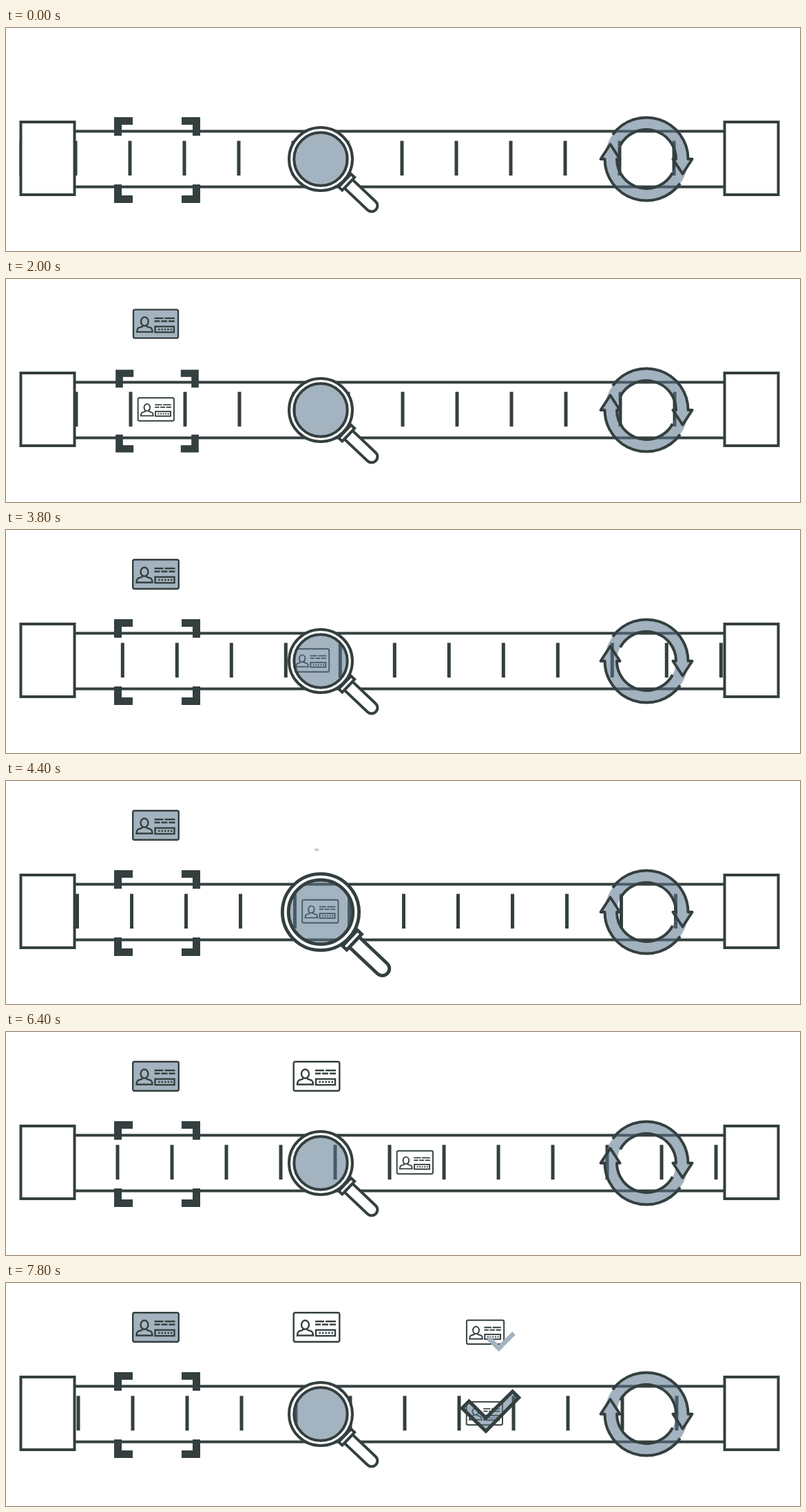
An HTML page for the animation above (8000 ms loop, 1153 by 325 pixels).

```html
<!DOCTYPE html>
<html lang="en">
<head>
<meta charset="utf-8">
<title>Document conveyor</title>
<style>
  html, body { margin: 0; width: 100%; height: 100%; overflow: hidden; background: #fff; }
  svg { display: block; width: 100vw; height: 100vh; }
  .line { fill: none; stroke: #343f3f; stroke-width: 4; }
  .solid { fill: #fff; }
  .dark { fill: #343f3f; }
  .tint { fill: #58758b; opacity: .55; }
  .blue { fill: #a3b3bf; }
</style>
</head>
<body>
<svg viewBox="0 0 1153 325">
  <defs>
    <rect id="cardFill" x="-33.3" y="-21.3" width="66.6" height="42.6" rx="2.5"/>
    <g id="cardInk" class="line" style="stroke-width:2.4">
      <use href="#cardFill"/>
      <ellipse cx="-16.5" cy="-3.5" rx="5.5" ry="6.5"/>
      <path d="M-20 2.500V4L-26 6Q-28 8-28 12H-5Q-5 8-7 6L-13 4V2.500"/>
      <path d="M-2-8.500H11M13-8.500H28M-2-4H6M8-4H17M19-4H28"/>
      <rect x="-1" y="4" width="28" height="8.5"/>
      <path d="M3.500 8.300H24" stroke-dasharray="2.5 2"/>
    </g>
    <path id="check" d="M-31-15L-41-5L-7 28L40-20L31-29L-7 9Z"/>
    <path id="corner" d="M-62.500-62.500H-35.500V-51.500H-51.500V-35.500H-62.500Z"/>
    <path id="head" d="M38.500 0H66.500L52.500 21.500Z"/>
    <path id="arrow" d="M-49-35.500A60.500 60.500 0 0 1 60.500 0H66.500L52.500 21.500L38.500 0H43A43 43 0 0 0-38-20"/>
  </defs>

  <path class="line" d="M100 150.500H1044M100 231.500H1044"/>
  <g id="ticks" class="line" style="stroke-width:5"></g>
  <g id="beltCard"><use href="#cardFill" class="solid"/><use href="#cardInk"/></g>
  <g class="line" style="fill:#fff">
    <rect x="21.5" y="137" width="78" height="106"/>
    <rect x="1043.5" y="137" width="78" height="106"/>
  </g>

  <g id="brackets" class="dark">
    <use href="#corner"/>
    <use href="#corner" transform="scale(-1 1)"/>
    <use href="#corner" transform="scale(1 -1)"/>
    <use href="#corner" transform="scale(-1)"/>
  </g>

  <g id="lens">
    <g class="line" style="fill:#fff" transform="rotate(43.5)">
      <path d="M54-10H100.500A8.500 8.500 0 0 1 100.500 7H54Z"/>
      <rect x="47" y="-14.5" width="7" height="26"/>
    </g>
    <circle class="tint" r="39"/>
    <circle r="42.5" fill="none" stroke="#fff" stroke-width="7"/>
    <circle class="line" r="46"/>
    <circle class="line" r="38.7"/>
  </g>

  <g transform="translate(930 191)" stroke-linejoin="round">
    <g class="tint">
      <circle r="51.75" fill="none" stroke="#58758b" stroke-width="17.5"/>
      <use href="#head"/>
      <use href="#head" transform="rotate(180)"/>
    </g>
    <use href="#arrow" class="line"/>
    <use href="#arrow" class="line" transform="rotate(180)"/>
  </g>

  <g id="beltCheck">
    <use href="#check" class="tint"/><use href="#check" class="line" style="stroke-width:5"/>
  </g>

  <g id="scanned"><g transform="translate(0 -38.5)">
    <use href="#cardFill" class="blue"/><use href="#cardInk"/>
  </g></g>
  <g id="inspected"><g transform="translate(0 -38.5)">
    <use href="#cardFill" class="solid"/><use href="#cardInk"/>
  </g></g>
  <g id="approved"><g transform="translate(0 -38.5)">
    <use href="#cardFill" class="solid"/><use href="#cardInk"/>
    <use href="#check" class="blue" transform="translate(28.7 17.2) scale(.63)"/>
  </g></g>
</svg>

<script>
const LOOP = 8000, STEP = 200;
const PITCH = 79, TRAVEL = 79.5;
const SCAN = 1490, INSPECT = 4085, APPROVE = 7386;   // arrival times at the stations
const POP_DELAY = 300, POP_TIME = 600;

const byId = id => document.getElementById(id);
const progress = (t, from, to) => Math.min(1, Math.max(0, (t - from) / (to - from)));
const glide = (t, from, to) => (1 - Math.cos(Math.PI * progress(t, from, to))) / 2;

// Grows from 0 to 1, shooting past the end when overshoot is above 0.
function pop(t, from, overshoot = 1.7) {
  const left = progress(t, from, from + POP_TIME) - 1;
  return 1 + (overshoot + 1) * left ** 3 + overshoot * left ** 2;
}

function wobble(t, from) {
  const u = Math.max(0, t - from);
  return 1 + .12 * Math.exp(-u / 415) * Math.sin(2 * Math.PI * u / 700);
}

const swell = (t, from) => 1 + .3 * Math.sin(Math.PI * progress(t, from, from + 1000)) ** 2;

function place(id, x, y, scale) {
  const part = byId(id);
  part.setAttribute("transform", `translate(${x} ${y}) scale(${scale})`);
  part.style.display = scale > 0 ? "" : "none";
}

byId("ticks").innerHTML = Array.from({ length: 13 }, (_, i) =>
  `<path d="M${i * PITCH} 164.500V215"/>`).join("");

function draw(now) {
  const t = Math.floor(now % LOOP / STEP) * STEP;
  const slots = 2 * glide(t, 0, SCAN) + 3 * glide(t, 2200, INSPECT) + 3 * glide(t, 5200, APPROVE);
  const offset = 22 + TRAVEL * slots;

  byId("ticks").setAttribute("transform", `translate(${22 + (offset - 22) % PITCH} 0)`);
  place("beltCard", offset + 36.8, 190, .785);
  place("brackets", 219.5, 192.5, wobble(t, SCAN));
  place("lens", 457, 191, swell(t, INSPECT));
  place("beltCheck", 704, 187.5, .94 * pop(t, APPROVE));
  place("scanned", 217.5, 103, pop(t, SCAN + POP_DELAY));
  place("inspected", 451, 103, pop(t, INSPECT + POP_DELAY, 0));
  place("approved", 696, 103, pop(t, APPROVE + POP_DELAY - 35));
}

let start;
function frame(now) {
  start ??= now;
  draw(now - start);
  requestAnimationFrame(frame);
}
draw(0);
requestAnimationFrame(frame);
</script>
</body>
</html>
```
